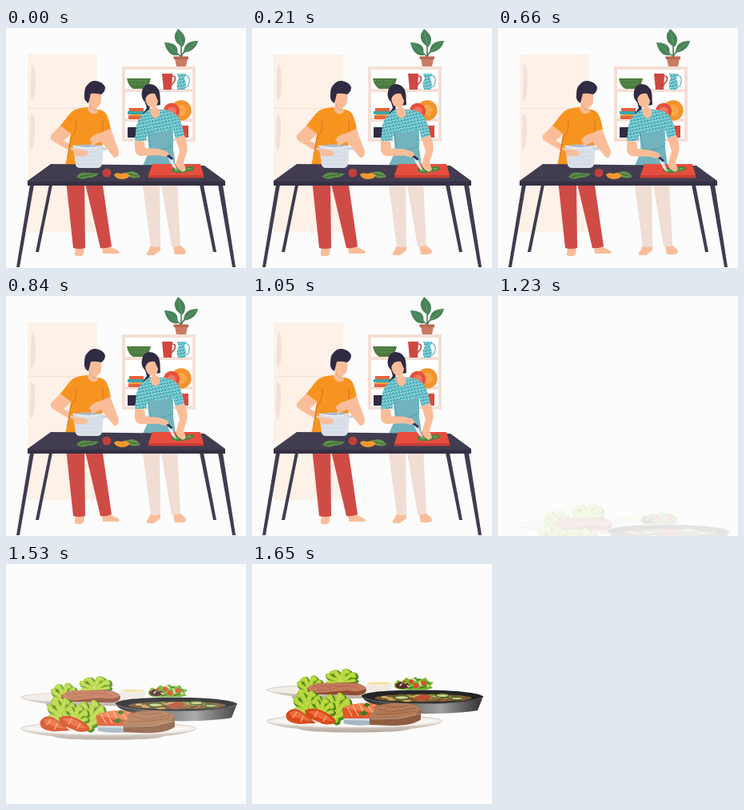
Recreate the animation shown at these times as an HTML page. Size 300 px wide and 300 px high, loop 3600 ms.

```html
<!DOCTYPE html>
<html lang="en">
<head>
<meta charset="utf-8">
<title>Cooking</title>
<style>
html, body { margin: 0; width: 100%; height: 100%; overflow: hidden; background: #fcfcfc; }
svg { display: block; width: 100vw; height: 100vh; }
.skin { fill: #fabd99; }
.dark { fill: #302b43; }
.line { fill: none; stroke-linecap: round; stroke-linejoin: round; }
</style>
</head>
<body>
<svg viewBox="0 0 300 300">
<defs>
  <pattern id="weave" width="4" height="4" patternUnits="userSpaceOnUse" patternTransform="rotate(-12)">
    <path d="M0 0h4v4H0z" fill="#38a9b5"/>
    <path d="M0 1.2l2 1.4 2-1.4M0 3.4h1.3" class="line" stroke="#d9f0ef" stroke-width=".9"/>
  </pattern>
  <linearGradient id="steel">
    <stop offset="0" stop-color="#2c2c2c"/><stop offset=".25" stop-color="#505050"/>
    <stop offset=".65" stop-color="#a0a0a0"/><stop offset=".82" stop-color="#666"/><stop offset="1" stop-color="#303030"/>
  </linearGradient>
  <linearGradient id="china" x2="0" y2="1">
    <stop offset="0" stop-color="#e9e2dc"/><stop offset="1" stop-color="#b5a79c"/>
  </linearGradient>
  <path id="lobes" class="line" d="M20 36V22M20 33L7 28 5 31M20 28L6 18 5 14M20 24L13 7 10 9M20 22L25 5 28 8M20 28L34 12 35 17M20 32L35 25"/>
  <g id="lettuce">
    <use href="#lobes" x="1.500" y="2" stroke="#4b8a17" stroke-width="9.500"/>
    <path fill="#4b8a17" d="M8 18L20 10 32 18 31 32 21 41 10 33Z"/>
    <use href="#lobes" stroke="#b3d334" stroke-width="6.500"/>
    <use href="#lobes" stroke="#cfe277" stroke-width="1"/>
  </g>
</defs>

<g id="kitchen">
  <path fill="#fdf1e8" d="M27 33h87v222H27z"/>
  <path d="M27 100.5h87" stroke="#f4e3d9" stroke-width="1.5"/>
  <path fill="#f1e1d8" d="M32 45Q37 46 37 67T32 90Q30 87 31 67ZM31 107Q37 107 36 130T31 153Q29 148 30 130Z"/>

  <path fill="#fff" stroke="#f4dfd6" stroke-width="4" d="M147 50h88v90h-88zM147 78h88M147 115h88"/>
  <path fill="#4c7b40" d="M151 63h30q-2 10-8 13h-14q-6-3-8-13z"/>
  <path class="line" stroke="#7ba363" stroke-width="1" stroke-dasharray="1 3" d="M154 66h24M157 70h18"/>
  <path fill="#cf4740" d="M195 57h13l-1 20h-10z"/>
  <path class="line" stroke="#cf4740" stroke-width="1.7" d="M208 60q5 0 3 6l-4 5"/>
  <path fill="url(#weave)" d="M214 57h11l-2 6q4 9 0 14h-8q-3-8 1-14z"/>
  <path class="line" stroke="#70bfc8" stroke-width="1.5" stroke-dasharray="2 1" d="M224 59q6 1 5 8t-5 7"/>
  <circle cx="219" cy="103" r="12.7" fill="#f5922b"/><circle cx="219" cy="103" r="7" fill="#f8a64c"/>
  <circle cx="207" cy="104" r="10.3" fill="#e6513e"/><circle cx="207" cy="104" r="5.5" fill="#ef7860"/>
  <path fill="#e8613d" d="M154 100h18v4h-18zM153 109h19v5h-19z"/>
  <path fill="#3ca5ad" d="M152 104h21v4h-21z"/><path fill="#f5a13b" d="M155 108h18v2h-18z"/>
  <path class="dark" d="M152 124h13v13h-13z"/><path fill="#d9473e" d="M217 122h11v15h-11z"/>

  <path class="line" stroke="#45764e" stroke-width="1.5" d="M219 37V20M219 36Q215 32 207 26M219 36Q222 28 233 21"/>
  <g fill="#478358">
    <path d="M220 24Q209 17 211 8L215 1Q224 8 224 14T220 24Z"/>
    <path d="M215 34Q202 36 198 18Q211 18 214 25Z"/>
    <path d="M222 31Q222 16 240 16Q237 29 222 31Z"/>
  </g>
  <path class="line" stroke="#79a77b" stroke-width=".7" d="M220 22L216 6M214 32L201 20M224 29L237 18"/>
  <path fill="#c97b62" d="M211 38h16l-2 10h-12z"/><path fill="#b96850" d="M209.500 35.500h18.500v3.500h-18.500z"/>

  <g id="man">
    <path class="skin" d="M87 274h11l-1 9q-3 3-8 2-4 0-3-4zM120 273h10l10 5q4 4-1 4h-18z"/>
    <path fill="#cf4b46" d="M75 190h23l1 85q-8 2-15 0zM98 190h22l12 83q-8 3-14 2z"/>
    <path class="skin" d="M69 121L83 130Q77 137 72 141L88 149Q98 151 102 157 99 161 90 160L60 142Q53 138 57 133Z"/>
    <path fill="#f7941f" d="M101 99Q84 100 79 108L68 122 81 132 78 154 74 172H120L121 131 131 127Q129 114 125 107 121 102 115 102Z"/>
    <path class="line" stroke="#b9652b" stroke-dasharray="1 1.5" d="M88 117Q88 131 81 137L77 161M121 117v15"/>
    <path class="skin" d="M103 80L118 78Q121 91 117 97L113 100 115 105Q108 111 102 102L104 96Z"/>
    <path class="line" stroke="#c99374" stroke-dasharray="1 1.5" d="M105 95q0 6 8 8"/>
    <path class="dark" d="M103 94Q97 91 98 83 98 75 101 72 106 65 112 66 121 67 124 74 124 80 119 83 111 81 106 82 103 86Z"/>
  </g>

  <g id="woman">
    <path class="skin" d="M181 272h12v6l-8 6h-8q-3-2 0-4zM209 272h9l6 5q3 5-3 6h-10z"/>
    <path fill="#f0ddd4" d="M170 190h22l1 83q-6 2-12 0zM193 190h21l4 82q-6 2-11 1z"/>
    <path class="dark" d="M174 93Q168 87 170 79 172 70 180 70 190 71 192 81L193 96Q186 98 180 96 180 104 174 109L171 107 176 100Z"/>
    <path fill="url(#weave)" d="M180 101L173 106Q166 111 163 122L161 141H175L177 132 180 172H209L209 126 212 139 223 135Q220 117 214 109 207 103 197 102Z"/>
    <path fill="#73b3bd" d="M178 128Q195 136 207 124L208 144 212 172H171Q176 160 181 151Z"/>
    <path class="line" stroke="#519ca8" d="M181 151q14 4 27-4M177 129l4 22"/>
    <path class="skin" d="M174 86Q181 79 187 81L190 84Q191 95 187 98L192 102Q195 109 187 113 181 111 180 104L183 100Q174 98 174 86Z"/>
    <path class="dark" d="M174 89Q177 80 186 82L191 93Q195 83 188 75 177 70 172 78Z"/>
  </g>

  <g fill="#413c50">
    <path d="M30 196h5L17 299h-4zM54 196h4L41 280h-4zM242 196h5l16 84h-4zM265 196h6l16 103h-4z"/>
    <path d="M56 170L248 172 274 191V197H27V191Z"/>
  </g>
  <path fill="#353044" d="M27 192h247v5H27z"/>

  <path fill="#5b8c47" d="M88 186q5-7 14-5l14 1q-4 5-13 5-9 4-15-1z"/>
  <path class="line" stroke="#345f37" d="M92 186l17-3"/>
  <path fill="#64934b" d="M147 181l11-2 6 2 4 5q-8 3-14 0z"/>
  <path class="line" stroke="#36633a" d="M151 182l13 3"/>
  <circle cx="126" cy="181" r="5.500" fill="#c83c3d"/><path fill="#467444" d="M123 176l3 1 3-1-2 3z"/>
  <path fill="#f4982f" d="M135 183q3-3 9-1 7-2 11 2-2 5-11 5-8-1-9-6z"/>
  <path fill="#e84e3e" d="M183 170H243L247 184H178Z"/><path fill="#c93d36" d="M178 184h69v3.500h-69z"/>
  <path fill="#4e823f" d="M206 178q4-5 14-4l13-1q5 3 0 5l-13 3q-10 1-14-3z"/>
  <path class="line" stroke="#85ad5b" stroke-width="1.5" d="M211 178h4m5 0h4m3-2h4"/>

  <path fill="#d9e0e9" d="M84 148H122L120 170Q119 175 114 175H93Q88 175 87 171Z"/>
  <path class="line" stroke="#b7c2d2" stroke-width=".8" stroke-dasharray=".5 4" d="M88 155h30M89 160h30M88 165h30M90 170h27"/>
  <ellipse cx="103" cy="148" rx="19" ry="2.500" fill="#aeb9c8"/>
  <path class="line" stroke="#eef2f6" stroke-width="1.500" d="M84 147.500q19 5 38 0"/>
  <path class="line" stroke="#cbd3de" stroke-width="3" d="M84 151h-2M122 151h3"/>
  <path class="skin" d="M82 151l10 1q8 0 11 4-2 5-9 4h-7z"/>

  <g id="stir">
    <path class="line" stroke="#c7ccd4" stroke-width="1.500" d="M113 137l-6 11"/>
    <path class="skin" d="M120 130L131 126 141 154Q141 163 135 162L119 142 109 146Q106 147 107 142L104 140Q109 132 119 131Z"/>
  </g>
  <path class="skin" d="M212 138L223 134Q228 147 226 155L222 168 225 177 221 180 215 176 212 171 217 154Z"/>
  <g id="chop">
    <path fill="#e3e6eb" d="M202 161L206 160 214 177Q208 176 202 161Z"/>
    <path class="line" stroke="#303454" stroke-width="3" d="M199 157L207 163"/>
    <path class="skin" d="M161 141L173 142 174 150 191 151 201 154 204 158 199 161 191 159 168 160Q161 158 161 151Z"/>
  </g>
</g>

<g id="meal">
  <path fill="url(#china)" d="M18 156Q22 162 50 165V168H145V156Z"/>
  <ellipse cx="90" cy="157.500" rx="71.500" ry="6" fill="#f3ede8" stroke="#d8cdc4"/>
  <use href="#lettuce" transform="translate(55 138) scale(.85 .75)"/>
  <use href="#lettuce" transform="translate(90 130) scale(1.050 .62)"/>
  <path fill="#8f4c34" d="M69 155Q80 148 96 149L126 148Q143 151 143 158 141 165 126 164L83 163Q69 164 69 155Z"/>
  <path fill="#c47a5b" d="M70 154Q80 147 96 149L127 149Q142 151 142 156 136 161 119 158L85 161Q70 161 70 154Z"/>
  <path class="line" stroke="#a65f45" stroke-dasharray="1 2" d="M76 154l15-2 10 4 14-4 19 3M82 158l17-1M98 152l30 0"/>

  <path fill="#efe9e3" d="M142 148.500h34l-4 10h-26z"/>
  <ellipse cx="159" cy="149" rx="17" ry="2.800" fill="#fbf7ef"/><ellipse cx="159" cy="149.300" rx="14.500" ry="1.800" fill="#f4e3a2"/>

  <path fill="#79b52b" d="M178 150l4-5 5 2 6-5 5 3 6-4 6 4 7-3 4 5 6 1-4 4 3 3-7 2h-35l-6-3z"/>
  <path fill="#54282f" d="M179 151l6-4 6 3 4-1 2 5-8 2-8-1z"/>
  <g fill="#dd4a2b">
    <circle cx="199" cy="147" r="3"/><circle cx="205" cy="152" r="3.300"/><circle cx="215" cy="149" r="3"/><circle cx="190" cy="147" r="1.700"/>
  </g>
  <path class="line" stroke="#f3ead2" stroke-width="1.500" d="M194 152l3 2M201 144l4 2M209 147l2 5M185 152l2-2M219 153l2-1"/>
  <path class="line" stroke="#3f7420" stroke-width="1.300" d="M196 155l5-1M210 155l8-2M206 145l5-1M219 148l3 1"/>

  <path fill="url(#steel)" d="M137 164Q138 171 151 175L168 182Q195 188 230 187 265 186 282 183L289 165Z"/>
  <path fill="#232425" d="M137 165C140 155 282 155 289 166 283 178 145 178 137 165Z"/>
  <path class="line" stroke="#77797a" stroke-width=".8" d="M139 167Q157 174.500 213 174.500T288 167"/>
  <ellipse cx="214" cy="167.500" rx="61" ry="5" fill="#745632"/>
  <g id="stew"></g>
  <g fill="#cfd08a" stroke="#49662c" stroke-width="1.500">
    <ellipse cx="187" cy="167" rx="9" ry="2.600"/><ellipse cx="238" cy="164.500" rx="8" ry="2.300"/><ellipse cx="256" cy="168" rx="7" ry="1.800"/>
  </g>
  <path fill="#bf4d37" d="M203 166l11-3 11 3-5 3-12 0z"/>

  <path fill="url(#china)" d="M18 196Q20 202 58 206 66 210.500 128 210.500T198 206Q236 202 238 196Z"/>
  <ellipse cx="128" cy="196.500" rx="109.500" ry="8.300" fill="#f4eeea" stroke="#d3c8bf"/>
  <path class="line" stroke="#fff" stroke-width="1.500" d="M31 196Q75 202 128 202T225 196"/>
  <use href="#lettuce" transform="translate(50 157) scale(.95 .85)"/>
  <use href="#lettuce" transform="translate(84 159) scale(1.020 1)"/>
  <use href="#lettuce" transform="translate(68 166) scale(.9 .75)"/>
  <path fill="#d84a1c" d="M43 187Q49 178 60 183L80 199 59 200Q40 198 43 187ZM66 183Q77 177 91 185 104 191 105 197 101 202 89 200L68 191Z"/>
  <path fill="#ef6b3a" d="M47 186q7-5 14 0l13 10q-8 1-18-4-8 0-9-6zM70 185q10-4 21 3l10 8q-8 1-20-5z"/>
  <path class="line" stroke="#f9b48d" stroke-width="1.200" d="M51 192l5-7M61 197l3-7M78 191l4-7M89 197l4-7"/>

  <path fill="#a5b5c3" d="M114 190L150 193V201Q126 203 115 199Z"/>
  <path fill="#cfdae2" d="M114 190l35 2v4l-34-1z"/>
  <path fill="#e2562a" d="M113 180Q126 173 147 174L170 179V189L150 193H114Z"/>
  <path fill="#f07f4c" d="M114 180Q126 173 147 174L169 179 150 186Z"/>
  <path class="line" stroke="#ffd0a5" d="M119 179l6 11M126 177l7 13M134 175l8 15M143 175l9 12M152 176l9 9"/>
  <path fill="#8f5c42" d="M147 189Q156 183 152 179 164 173 184 174 205 174 211 181V194Q203 202 173 202L147 201Z"/>
  <path fill="#b37a58" d="M152 180Q164 174 184 174 204 174 211 181 208 190 185 192L147 193V188Q156 184 152 180Z"/>
  <path class="line" stroke="#8a5638" stroke-dasharray="1.500 2" d="M158 181l15 4 14-2 17-3M168 177l10 2 17-2M155 188l24-1 25-3"/>
  <path class="line" stroke="#c9a084" d="M149 194l36-1 25-6"/>
  <path fill="#3f7a24" d="M134 187l6-4 5 3-4 4zM139 177l4-4 5 3-4 3z"/>
</g>
</svg>
<script>
const LOOP = 3600, CUT = 1110, RISE_START = 1197, RISE_END = 1640;
const part = id => document.getElementById(id);
const [kitchen, meal, stir, chop, stew] = ["kitchen", "meal", "stir", "chop", "stew"].map(part);

// Chopped vegetables scattered over the pan's surface
const colors = ["#d9bf7c", "#8f6433", "#cfa653", "#87893f", "#b9573b"];
let pieces = "";
for (let i = 0; i < 30; i++) {
  const angle = i * 2.4, radius = Math.sqrt((i + .5) / 30);
  const x = 214 + 55 * radius * Math.cos(angle), y = 167.5 + 4 * radius * Math.sin(angle);
  pieces += `<ellipse cx="${x}" cy="${y}" rx="${3 + i % 4}" ry="1.2" fill="${colors[i % 5]}"/>`;
}
stew.innerHTML = pieces;

function draw(now) {
  const t = now % LOOP;
  const swing = (1 - Math.cos(2 * Math.PI * t / CUT)) / 2;
  const left = 1 - Math.min(1, Math.max(0, (t - RISE_START) / (RISE_END - RISE_START)));
  kitchen.style.display = t < CUT ? "" : "none";
  stir.setAttribute("transform", `rotate(${-2 * swing} 137 158)`);
  chop.setAttribute("transform", `rotate(${4 * swing} 165 150)`);
  meal.setAttribute("transform", `translate(0 ${150 * left * left})`);
  meal.setAttribute("opacity", 1 - left ** 1.5);
}

let start;
function tick(now) {
  start ??= now;
  draw(now - start);
  requestAnimationFrame(tick);
}
draw(0);
requestAnimationFrame(tick);
</script>
</body>
</html>
```
